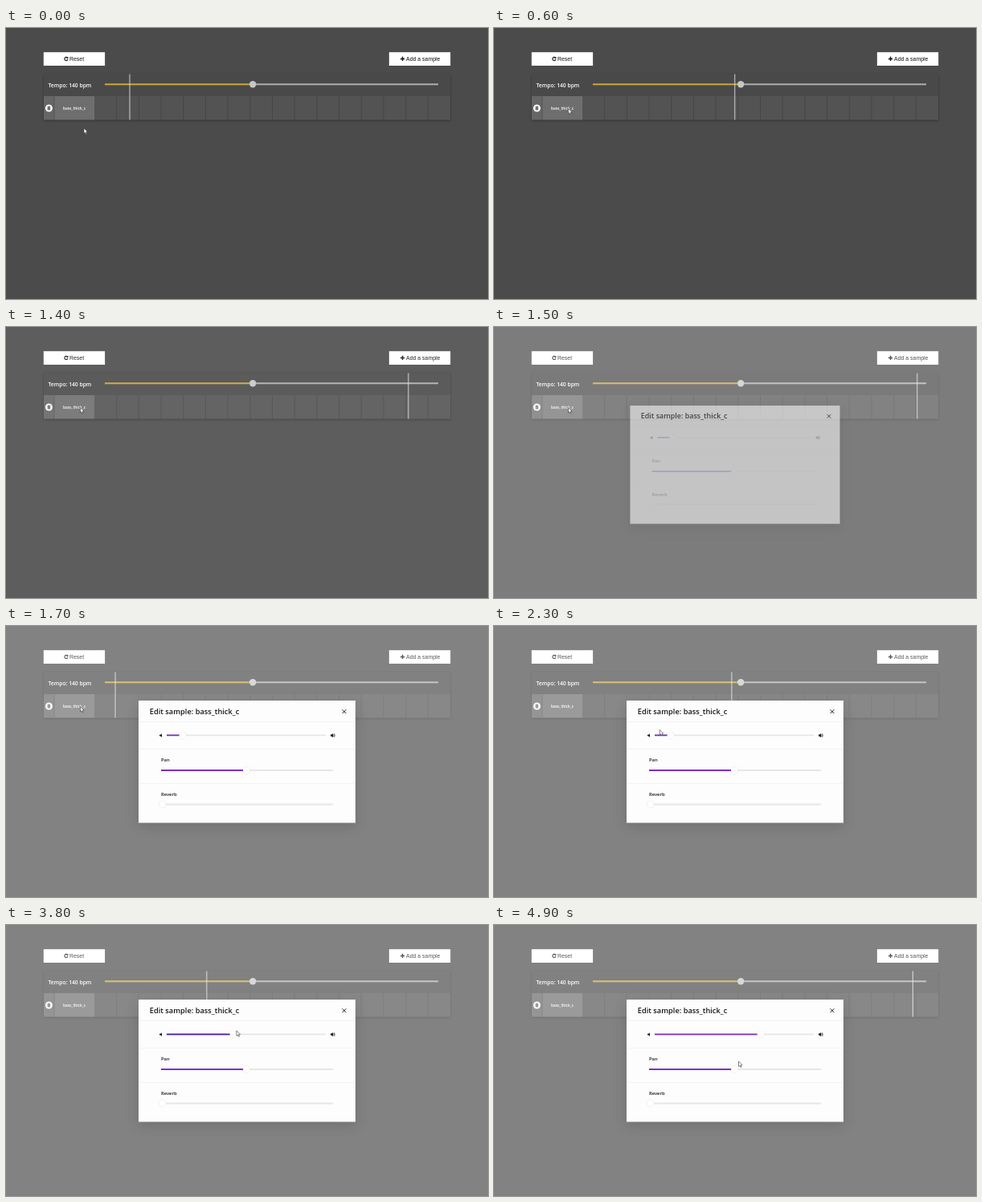
These frames come from a looping animation (600x338 px, 5 s). An HTML page:

```html
<!DOCTYPE html>
<html lang="en">
<head>
<meta charset="utf-8">
<title>Sample sequencer</title>
<style>
  html, body { margin: 0; width: 100%; height: 100%; overflow: hidden; background: #4b4b4b; }
  svg { display: block; width: 100%; height: 100%; }
  text { font-family: "Open Sans", "Noto Sans", sans-serif; font-weight: 600; }
  .btn text { font: 400 6.95px "Liberation Sans", Arial, sans-serif; fill: #111; }
  .btn rect { fill: #fff; }
  .icon { fill: none; stroke: #111; }
  .soft { filter: drop-shadow(0 1px 1.5px rgba(0, 0, 0, .35)); }
  .deep { filter: drop-shadow(0 4px 8px rgba(0, 0, 0, .14)); }
  .knob { fill: #fff; filter: drop-shadow(.6px .8px .4px rgba(0, 0, 0, .25)); }
  .track { fill: none; stroke: #e6e6e8; stroke-width: 1.8; }
  .fill { fill: none; stroke: #7d2fc8; stroke-width: 1.8; }
  .rule { stroke: #efefef; stroke-width: .7; }
  .small { font-size: 5.85px; fill: #1c1c1c; }
</style>
</head>
<body>
<svg viewBox="0 0 600 338">
  <rect width="600" height="338" fill="#4b4b4b"/>

  <g class="btn">
    <rect x="46.8" y="30.2" width="76.3" height="16.8"/>
    <path class="icon" stroke-width="1.1" d="M76.6 37.2A2.1 2.1 0 1 0 76.9 39.3"/>
    <path d="M77.4 35.8V38.2H75Z" fill="#111"/>
    <text x="79" y="41">Reset</text>
    <rect x="476.9" y="30.2" width="76.3" height="16.8"/>
    <path class="icon" stroke-width="1.5" d="M491 38.4H496.2M493.6 35.8V41"/>
    <text x="498" y="41">Add a sample</text>
  </g>

  <rect class="soft" x="47" y="57" width="506" height="57.5" fill="#494949"/>
  <text x="52.5" y="74.4" font-size="6.75" fill="#fff">Tempo: 140 bpm</text>
  <path d="M307 70.3H538" stroke="#acacac" stroke-width="1.9"/>
  <path d="M123 70.3H307" stroke="#c9a63a" stroke-width="1.9"/>

  <rect x="47" y="85" width="13" height="29.5" fill="#666"/>
  <rect x="60" y="85" width="50" height="29.5" fill="#6e6e6e"/>
  <rect x="110" y="85" width="443" height="29.5" fill="#535353"/>
  <path d="M60 85V114.5" stroke="#505050" stroke-width=".8"/>
  <path id="cells" stroke="#434343" stroke-width=".8"/>
  <circle cx="53.4" cy="100" r="4.5" fill="#fff"/>
  <rect x="51.6" y="97.4" width="3.6" height="5.2" rx=".6" fill="#707070"/>
  <text x="71" y="101.7" font-size="4.75" fill="#fff">bass_thick_c</text>

  <path id="head" d="M0 57.5V114.5" stroke="#e0e0e0" stroke-width=".9"/>
  <circle cx="307.2" cy="70.3" r="4.2" fill="#c6c6c6"/>

  <rect id="veil" width="600" height="338" fill="#fff"/>

  <g id="modal">
    <rect class="deep" x="165" y="93" width="270" height="152.5" fill="#fdfdfd"/>
    <text x="178.8" y="109.6" font-size="9.25" fill="#151515">Edit sample: bass_thick_c</text>
    <path class="icon" stroke-width=".95" d="M418.6 104.3L423.4 109.1M423.4 104.3L418.6 109.1"/>
    <g id="body">
      <path class="rule" d="M165 119.5H435M165 153.5H435M165 196.5H435"/>
      <path d="M191 135.7H192.2L194 134.3V138.7L192.2 137.3H191Z" fill="#111"/>
      <path d="M404 135.6H405.2L407 134V139L405.2 137.4H404Z" fill="#111"/>
      <path class="icon" stroke-width=".7" d="M407.6 135.2Q408.5 136.5 407.6 137.8M408.5 134.2Q410 136.5 408.5 138.8"/>
      <path class="track" d="M200 136.3H398"/>
      <path id="volFill" class="fill"/>
      <circle id="volKnob" class="knob" cy="136.3" r="4.4"/>
      <text class="small" x="193" y="169">Pan</text>
      <path class="track" d="M193 180H407"/>
      <path class="fill" d="M193 180H299"/>
      <circle class="knob" cx="299.4" cy="180" r="4.4"/>
      <text class="small" x="193" y="211.8">Reverb</text>
      <path class="track" d="M193 222.5H407"/>
      <circle class="knob" cx="194.6" cy="222.5" r="4.4"/>
    </g>
  </g>

  <path id="cursor" d="M0 0V6.5L1.5 5.2L2.5 7.5L3.6 7L2.6 4.8L4.6 4.6Z"
        fill="#fff" stroke="#333" stroke-width=".6" stroke-linejoin="round"/>
</svg>
<script>
  const LOOP = 5000, STEP = 100;
  const ROW_X = 110, ROW_W = 443, CELLS = 16;
  const HEAD_X = 44, HEAD_SPEED = .2555, HEAD_DRIFT = 11;
  const OPEN = 250;
  const DRAG = { from: 2450, to: 4250 };

  const $ = id => document.getElementById(id);
  const set = (id, name, value) => $(id).setAttribute(name, value);
  const mix = (a, b, p) => a + (b - a) * p;
  const progress = (t, from, to) => Math.min(1, Math.max(0, (t - from) / (to - from)));

  const linear = p => p;
  const smooth = p => p * p * (3 - 2 * p);
  const easeIn = p => p * p;
  const easeOut = p => 1 - (1 - p) ** 3;

  // The pointer goes to the sample, to the knob, drags it, then leaves.
  const moves = [
    { from: 0, to: 500, x: 92.5, y: 100.5, ease: smooth },
    { from: 1800, to: DRAG.from, x: 224, y: 134, ease: smooth },
    { ...DRAG, x: 336, y: 130, ease: easeIn },
    { from: 4400, to: 4900, x: 304.5, y: 170, ease: linear }
  ];

  function pointer(t) {
    let x = 97, y = 125;
    for (const m of moves) {
      const p = m.ease(progress(t, m.from, m.to));
      x = mix(x, m.x, p);
      y = mix(y, m.y, p);
    }
    return `translate(${x} ${y})`;
  }

  function render(t) {
    const drift = HEAD_DRIFT * Math.sin(2 * Math.PI * t / LOOP);
    const x = ROW_X + (HEAD_X + HEAD_SPEED * t - drift) % ROW_W;
    set("head", "transform", `translate(${x} 0)`);

    set("veil", "opacity", .305 * easeOut(progress(t, 1370, 1370 + OPEN)));

    const open = easeOut(progress(t, 1440, 1440 + OPEN));
    const scale = mix(.925, 1, open);
    set("modal", "opacity", open);
    set("modal", "transform", `translate(300 245.5) scale(${scale}) translate(-300 -245.5)`);
    set("body", "opacity", open * open);
    set("body", "transform", `translate(0 ${mix(-5, 0, open)})`);

    const drag = progress(t, DRAG.from, DRAG.to);
    const knob = mix(220, 332, easeIn(drag));
    set("volFill", "d", `M200 136.3H${knob}`);
    $("volFill").style.stroke = drag > 0 && drag < 1 ? "#4a17ac" : "";
    set("volKnob", "cx", knob);

    set("cursor", "transform", pointer(t));
  }

  let lines = "";
  for (let i = 1; i < CELLS; i++) lines += `M${ROW_X + i * ROW_W / CELLS} 85V114.5`;
  set("cells", "d", lines);

  const start = performance.now();
  function tick() {
    const t = (performance.now() - start) % LOOP;
    render(Math.floor(t / STEP) * STEP);
    requestAnimationFrame(tick);
  }
  render(0);
  requestAnimationFrame(tick);
</script>
</body>
</html>
```
